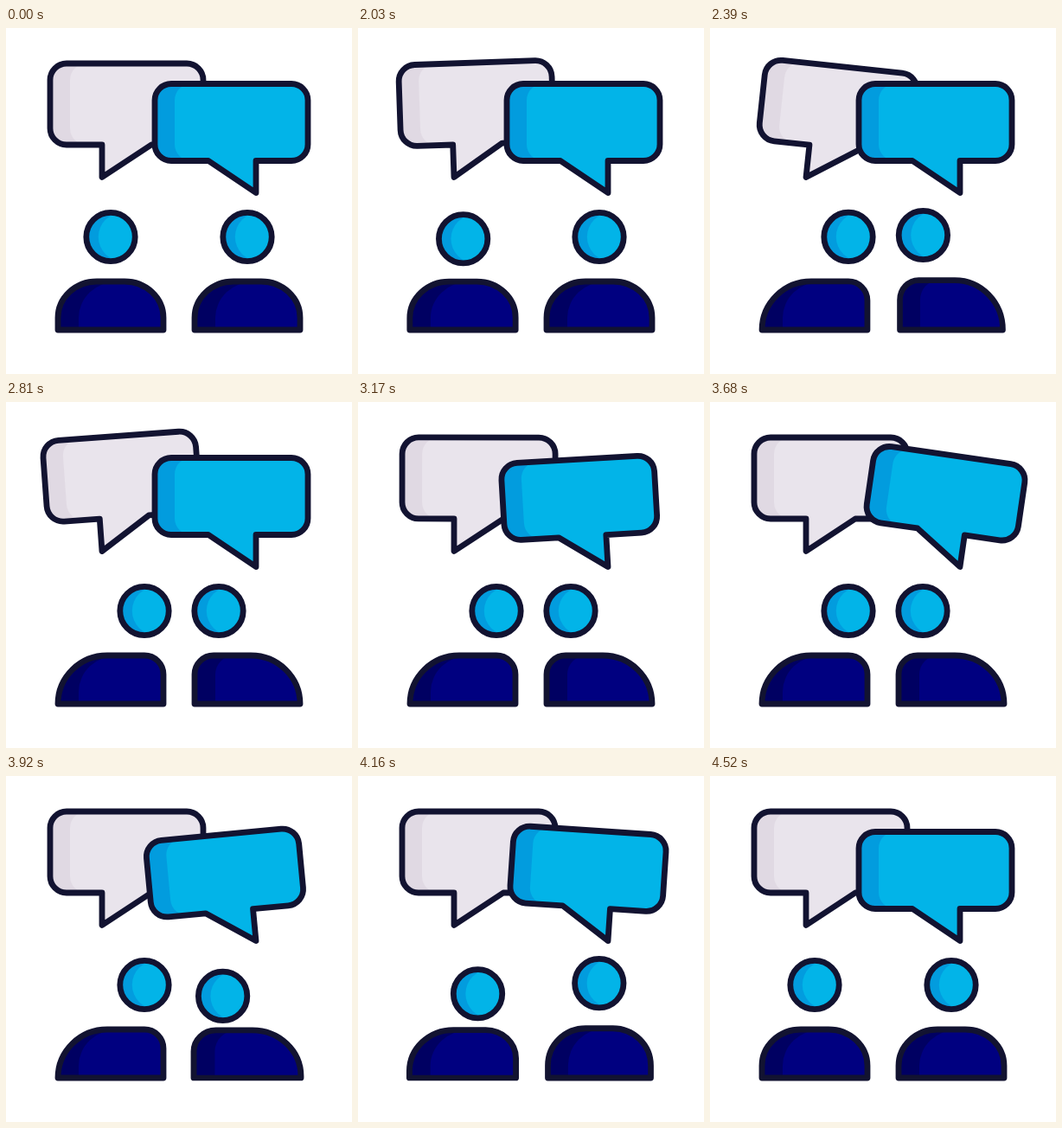
Recreate the animation shown at these times as an HTML page with a canvas. Size 400x400 px, loop 4550 ms.

```html
<!DOCTYPE html>
<html lang="en">
<head>
<meta charset="utf-8">
<title>Conversation</title>
<style>
  html, body { margin: 0; width: 100%; height: 100%; overflow: hidden; background: #fff; }
  canvas { display: block; width: 400px; height: 400px; }
</style>
</head>
<body>
<canvas id="stage" width="400" height="400"></canvas>
<script>
const ctx = document.getElementById('stage').getContext('2d');
const LOOP = 4550, HOLD = 2030;
const INK = '#121331';
const BLUE = ['#02b4e8', '#029cde'];
const PALE = ['#e9e4ec', '#e0d9e3'];
const NAVY = ['#000080', '#000062'];

// Key lists alternate time and value, eased with a cosine.
const SWING = [0, 0, 227, -20, 497, 15, 710, -10, 980, 5, 1200, 0];
const LEAN = [0, 0, 340, 1];
const DIP = [0, 0, 110, 15, 310, -2, 400, 0];
const WIDTH = [0, 1, 120, 1.02, 310, 0.975, 400, 1];
const NOD = [0, 0, 170, 1, 340, 0];

function at(keys, time) {
  if (time <= keys[0]) return keys[1];
  for (let i = 2; i < keys.length; i += 2) {
    if (time < keys[i]) {
      const u = (time - keys[i - 2]) / (keys[i] - keys[i - 2]);
      return keys[i - 1] + (keys[i + 1] - keys[i - 1]) * (1 - Math.cos(Math.PI * u)) / 2;
    }
  }
  return keys[keys.length - 1];
}

const mix = (a, b, p) => a + (b - a) * p;

// Shade fills the outline; the lit part covers it inside the same outline.
function piece(outline, lit, [main, shade]) {
  ctx.save();
  ctx.clip(outline);
  ctx.fillStyle = shade;
  ctx.fill(outline);
  ctx.fillStyle = main;
  ctx.fill(lit);
  ctx.restore();
  ctx.stroke(outline);
}

function bubblePath(x, y, w, h, tail) {
  const r = 19, right = x + w, bottom = y + h;
  const path = new Path2D();
  path.moveTo(x + r, y);
  path.arcTo(right, y, right, bottom, r);
  path.arcTo(right, bottom, x, bottom, r);
  tail.forEach(([px, py]) => path.lineTo(px, py));
  path.arcTo(x, bottom, x, y, r);
  path.arcTo(x, y, right, y, r);
  path.closePath();
  return path;
}

function bubble(x, y, h, tail, colors, start) {
  return {
    outline: bubblePath(x, y, 177, h, tail),
    lit: bubblePath(x + 23, y, 177, h, tail),
    tip: tail[1], colors, start
  };
}

const bubbles = [
  bubble(51, 41, 94, [[168, 135], [111, 172.5], [111, 135]], PALE, 1985),
  bubble(172, 64.5, 89, [[289, 153.5], [289, 190.5], [234, 153.5]], BLUE, 3110)
];

function drawBubble({ outline, lit, tip: [x, y], colors, start }, time) {
  ctx.save();
  ctx.translate(x, y);
  ctx.rotate(at(SWING, time - start) * Math.PI / 180);
  ctx.translate(-x, -y);
  piece(outline, lit, colors);
  ctx.restore();
}

// Shoulders standing on y = 0; each top corner has its own radii.
function bodyPath(x, left, right) {
  const path = new Path2D();
  path.moveTo(x - 61, 0);
  path.ellipse(x - 61 + left[0], left[1] - 56, ...left, 0, Math.PI, Math.PI * 1.5);
  path.ellipse(x + 61 - right[0], right[1] - 56, ...right, 0, -Math.PI / 2, 0);
  path.lineTo(x + 61, 0);
  path.closePath();
  return path;
}

function headPath(x) {
  const path = new Path2D();
  path.arc(x, 0, 28.2, 0, Math.PI * 2);
  return path;
}

const people = [
  { x: 121, side: 1, reach: 39, go: 2003, back: 3980, nod: 3300 },
  { x: 279, side: -1, reach: 33, go: 2075, back: 3838, nod: LOOP }
];

function drawPerson({ x, side, reach, go, back, nod }, time) {
  const lean = at(LEAN, time - go) - at(LEAN, time - back);
  const dip = at(DIP, time - go) + at(DIP, time - back);
  const width = at(WIDTH, time - go) * at(WIDTH, time - back);
  const bow = at(NOD, time - nod);
  const round = [45, 42];
  const outer = [mix(45, 57, lean), mix(42, 56, lean)];
  const inner = [mix(45, 22, lean), mix(42, 22, lean)];
  const [left, right] = side > 0 ? [outer, inner] : [inner, outer];

  ctx.save();
  ctx.translate(x, 349);
  ctx.scale(width, 2 - width);
  piece(bodyPath(0, left, right), bodyPath(24, side > 0 ? round : inner, inner), NAVY);
  ctx.restore();

  ctx.save();
  ctx.translate(x + side * reach * lean + 4 * bow, 241.5 + dip + 9 * bow);
  piece(headPath(0), headPath(14), BLUE);
  ctx.restore();
}

function draw(now) {
  let time = now % LOOP;
  if (time < HOLD) time = 0;
  ctx.fillStyle = '#fff';
  ctx.fillRect(0, 0, 400, 400);
  ctx.strokeStyle = INK;
  ctx.lineWidth = 6.8;
  ctx.lineJoin = 'round';
  people.forEach(person => drawPerson(person, time));
  bubbles.forEach(item => drawBubble(item, time));
  requestAnimationFrame(draw);
}
requestAnimationFrame(draw);
</script>
</body>
</html>
```
